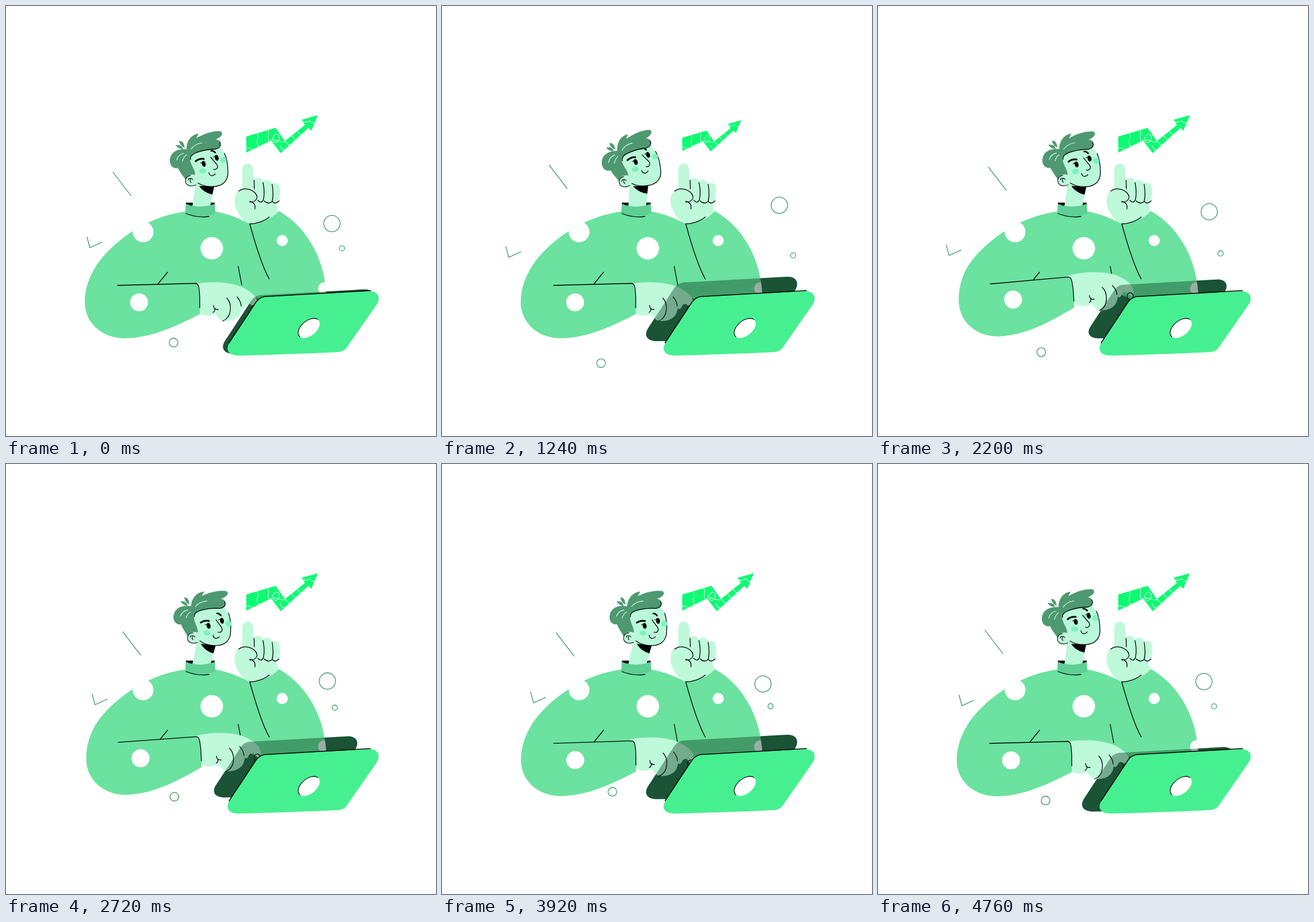
Animation, 748 px wide and 748 px high, one loop 4.8 s. Source, as an HTML page with a canvas:

```html
<!DOCTYPE html>
<html lang="en">
<head>
<meta charset="utf-8">
<title>Thinker at a laptop</title>
<style>
html, body { margin: 0; width: 100%; height: 100%; overflow: hidden; background: #fff; }
canvas { display: block; width: 748px; height: 748px; }
</style>
</head>
<body>
<canvas id="stage" width="748" height="748"></canvas>
<script>
const ctx = document.getElementById('stage').getContext('2d');
const LOOP = 4800, STEP = 40;
const GREEN = '#6be29f', SKIN = '#befada', FACE = '#b9f8d9', HAIR = '#4e9971', INK = '#000';

const shape = d => new Path2D(d);
const body = shape('M312 357.5C240 367 180 415 155 455L200 492H400L440 510L557 500C553 432 518 381 475 357L424 379C405 369 385 361 364 357.5Z');
const arm = shape('M155 455L194 486L330 482C336 483 338 505 337 536C290 560 250 578 205 578C165 577 137 550 137 515C137 490 146 470 155 455Z');
const armLines = shape('M194 486L330 482.5C336 483 336 492 337 506V525');
const palm = shape('M326 484C360 477 400 481 418 493C428 499 436 506 437 513C441 531 430 528 426 519Q421 517 418 521C416 526 413 529 410 526C408 543 395 549 378 548C372 547 367 541 364 535C355 541 342 539 336 534L326 530Z');
const palmLines = shape('M384 508C393 517 394 541 377 548M402 506C407 512 409 517 409 522M361 521C361 525 363 528 369 528M363 527Q364 531 360 533M428 532C424 524 429 519 434 521Q438 524 437 529');
const fist = shape('M411 318C400 321 396 332 398 345C402 362 412 374 424 379C440 378 462 372 474 357L470 343C478 340 477 322 476 315C475 306 464 306 463 312C463 301 449 299 447 307C446 297 432 296 431 306L430 286C430 270 411 270 411 286Z');
const fistLines = shape('M431.5 303L432 318M405 322C413 315 427 318 434 326C440 334 435 341 424 341M424 340C431 341 434 346 433 353M447 307C449 316 450 326 448 336Q445 345 438 338M463 310C465 322 465 332 463 340Q456 346 449 339M475 339Q469 346 463 340');
const cuffLine = shape('M424 379C436 379 450 374 458 367');
const bodyLines = shape('M424 379C432 408 445 452 458 475M404 453L410 485M264 484L281 463');
const collar = shape('M312.5 344C330 351 348 350 363.5 344L364 361C345 368 325 366 312 361Z');
const collarLine = shape('M313 361C325 366 340 368 353 366');
const neck = shape('M330 305L324 350H355L363 312Z');
const neckShade = shape('M336 313L362 314L359 328C350 326 341 321 336 313Z');
const face = shape('M320 260L328 300C335 311 350 315 362 314C378 313 387 303 386 288C386 278 385 267 380 256L370 244L330 250Z');
const jaw = shape('M380 256C385 267 386 278 386 288C387 303 378 313 362 314C350 315 342 313 334 308');
const hair = shape('M285 267C287 253 299 248 314 249C314 236 321 224 335 222L331 230C345 222 360 217 373 218C379 220 376 228 365 232C374 233 376 240 370 247C362 252 350 249 340 253C330 256 322 258 320 265C322 280 330 285 329 294C322 292 316 294 313 303C308 296 302 288 299 282C290 284 284 276 285 267Z');
const fringe = shape('M372 237Q376 246 364 249C350 249 340 252 334 254C326 257 320 260 321 267');
const hairShine = shape('M297 268Q299 259 309 256M307 270Q309 262 314 259M322 249Q328 240 341 238');
const leaves = shape('M295 242Q306 240 308 249Q300 249 295 242ZM301 235Q309 233 311 247Q303 243 301 235Z');
const earLines = shape('M321 295C313 296 311 302 313 308C316 314 325 314 330 311M317 303C317 299 323 299 325 302M321 301Q319 305 322 307');
const noseMouth = shape('M356 263L367 276C370 281 366 286 361 284M353 290C354 296 360 297 364 292');
const browLeft = shape('M330 270Q336 265 344 266');
const browRight = shape('M357 252Q360 251 364 255');
const lid = shape('M450 506L630 496C646 495 653 506 645 519L597 588C591 598 587 601 578 602Q490 606 408 608C387 609 380 598 390 584L435 515Q441 507 450 506Z');
const lidLine = shape('M388 586L435 515Q441 507 450 505.5L634 495');
const arrow = shape('M418 227L469 212L485 235L520 207L514 198L542.5 190L531 217L526 212L478 256L461 234L418 255Z');
const arrowLines = shape('M437 221C442 228 432 236 440 245M455 216C460 222 453 228 458 235M462 237C464 224 472 219 475 226C477 234 468 242 465 235C465 229 474 238 485 236M486 235L493 243M497 226L503 233M507 218L513 225M515 200C523 207 527 196 531 202Q533 205 537 203M419 247Q426 247 429 250M477 243Q479 250 484 250');
const strokeMark = shape('M186 289L217 329.5');
const checkMark = shape('M141 402L146 420.5L167 411');

const fill = (path, color) => { ctx.fillStyle = color; ctx.fill(path); };
const line = (path, width = 1.3, color = INK) => {
  ctx.strokeStyle = color; ctx.lineWidth = width; ctx.stroke(path);
};
const oval = (x, y, rx, ry = rx, turn = 0) => {
  const p = new Path2D();
  p.ellipse(x, y, rx, ry, turn, 0, 2 * Math.PI);
  return p;
};
const group = draw => { ctx.save(); draw(); ctx.restore(); };
const rotateAt = (x, y, deg) => {
  ctx.translate(x, y); ctx.rotate(deg * Math.PI / 180); ctx.translate(-x, -y);
};
const scaleAt = (x, y, sx, sy = sx) => {
  ctx.translate(x, y); ctx.scale(sx, sy); ctx.translate(-x, -y);
};

// Eased interpolation through [time, value] pairs
function track(t, ...keys) {
  if (t <= keys[0][0]) return keys[0][1];
  for (let i = 1; i < keys.length; i++) {
    const [t0, a] = keys[i - 1], [t1, b] = keys[i];
    if (t < t1) return a + (b - a) * (1 - Math.cos(Math.PI * (t - t0) / (t1 - t0))) / 2;
  }
  return keys[keys.length - 1][1];
}
const pulse = (t, from, to) =>
  t > from && t < to ? Math.sin(Math.PI * (t - from) / (to - from)) ** 2 : 0;

function drift(t, path, [t1, x1, y1], [t2, x2, y2]) {
  const at = (a, b) => track(t, [0, 0], [t1, a], [t2, b], [LOOP, 0]);
  group(() => {
    ctx.translate(at(x1, x2), at(y1, y2));
    line(path, 1.1, '#1f8450');
  });
}

function drawFloaters(t) {
  drift(t, strokeMark, [1680, 0.5, -14.8], [3200, 22, 8]);
  drift(t, checkMark, [1720, -36.5, 20.3], [3200, 23, -8.6]);
  drift(t, oval(567, 378.5, 14.2), [1540, 21.8, -35], [3200, -15, 7.2]);
  drift(t, oval(584.5, 421.5, 4.5), [1540, 29, 13.7], [3200, -22.5, -0.3]);
  drift(t, oval(291.5, 585.5, 7.6), [1400, -15.3, 37], [3400, 7.2, -22]);
}

function drawBase(t, color) {
  const x = track(t, [0, -8], [500, -32.2], [1000, -30.5]);
  const y = track(t, [0, -3], [500, -27.5], [1000, -25], [4480, -25], [4760, -3.5]);
  const size = track(t, [1240, 1], [2200, 0.913], [3280, 0.988], [3600, 1]);
  group(() => {
    ctx.translate(x, y);
    scaleAt(517, 551.5, size);
    fill(lid, color);
  });
}

function drawHead(t) {
  const tilt = track(t, [0, 0], [1400, -5.3], [2800, 4.5], [4000, 4.5], [4760, 0]);
  const blink = 1 - 0.55 * pulse(t, 3120, 3440);
  group(() => {
    rotateAt(340, 350, tilt);
    fill(neck, FACE);
    fill(neckShade, INK);
    fill(face, FACE);
    line(jaw);
    group(() => {
      ctx.translate(Math.max(0, tilt * 0.7), tilt * (tilt > 0 ? 1.4 : 0.6));
      fill(oval(342, 287, 6, 4.5), '#7af3bd');
      fill(oval(378, 268, 5.5, 5), '#7af3bd');
      line(noseMouth);
      line(browLeft, 3);
      line(browRight, 2.6);
      for (const [x, y] of [[344, 274.5], [366.5, 264]]) group(() => {
        scaleAt(x, y, 1, blink);
        fill(oval(x, y, 3.4, 5.2, -0.25), INK);
        line(shape(`M${x - 6} ${y - 1}L${x - 1} ${y - 4}`), 1);
      });
    });
    fill(hair, HAIR);
    fill(leaves, HAIR);
    line(fringe);
    line(hairShine, 1.2, '#d9fbe9');
    fill(oval(321.5, 303.5, 9, 9.5), FACE);
    line(earLines, 1.1);
  });
}

function drawBody() {
  fill(body, GREEN);
  group(() => {
    ctx.clip(body);
    for (const [x, y, r] of [[238.5, 393, 18], [358, 421.5, 19.6], [480.5, 408, 9.7], [554, 491.5, 11]])
      fill(oval(x, y, r), '#fff');
  });
  line(bodyLines);
}

function drawRaisedHand(t) {
  group(() => {
    rotateAt(424, 379, 2.2 * pulse(t, 0, 1200));
    fill(fist, SKIN);
    line(fistLines);
  });
  line(cuffLine);
}

function drawTypingArm(t) {
  const lift = pulse(t, 1960, 2920) + pulse(t, 2920, 3880) + pulse(t, 3880, 4480);
  const reach = Math.min(1, 2 * lift);
  group(() => {
    rotateAt(155, 459, -7.2 * lift);
    group(() => {
      ctx.translate(3.5 * reach, -4 * Math.max(reach, pulse(t, 3760, 4080)));
      fill(palm, SKIN);
      line(palmLines);
    });
    fill(arm, GREEN);
    fill(oval(231.5, 515.5, 15.6), '#fff');
    line(armLines);
  });
}

function drawLid() {
  fill(lid, '#46f090');
  line(lidLine, 1.4);
  fill(oval(527, 560.5, 21.8, 13, -0.68), '#fff');
  const rim = new Path2D();
  rim.ellipse(527, 560.5, 21.8, 13, -0.68, Math.PI * 0.95, Math.PI * 1.95);
  line(rim, 1.1);
}

function drawArrow(t) {
  group(() => {
    scaleAt(418, 239, track(t, [0, 1], [600, 1.25], [1400, 0.78], [2000, 1]));
    fill(arrow, '#0dfb72');
    line(arrowLines, 1.1, '#d6ffe8');
  });
}

function render(t) {
  ctx.fillStyle = '#fff';
  ctx.fillRect(0, 0, 748, 748);
  ctx.lineCap = ctx.lineJoin = 'round';
  drawFloaters(t);
  drawBase(t, 'rgb(42,104,74)');
  drawBody();
  fill(shape('M313 342H363V349H313Z'), INK);
  drawHead(t);
  fill(collar, '#5ecf95');
  line(collarLine);
  drawRaisedHand(t);
  drawTypingArm(t);
  // The base also tints the figure in front of it
  drawBase(t, 'rgba(5,50,25,0.4)');
  drawLid();
  drawArrow(t);
}

const start = performance.now();
function tick() {
  const t = (performance.now() - start) % LOOP;
  render(Math.floor(t / STEP) * STEP);
  requestAnimationFrame(tick);
}
tick();
</script>
</body>
</html>
```
